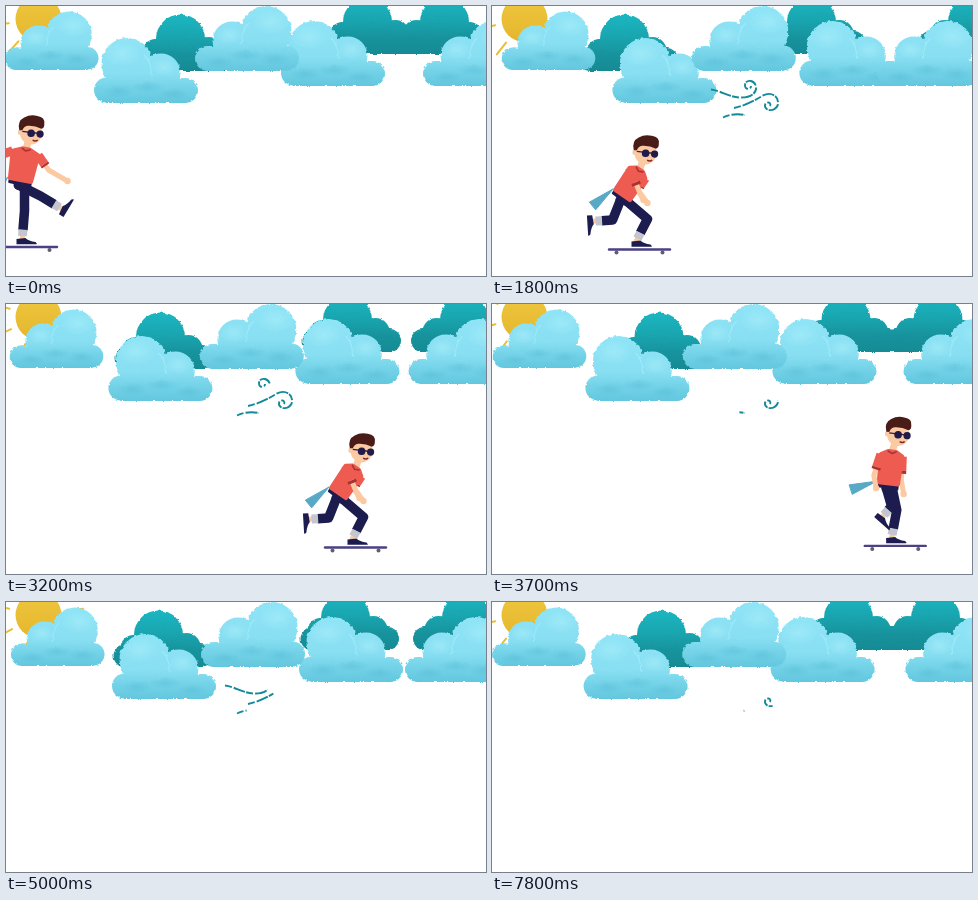
Recreate the animation shown at these times as an HTML page. Size 480 by 270 pixels, loop 8010 ms.

```html
<!DOCTYPE html>
<html lang="en">
<head>
<meta charset="utf-8">
<title>Skater under drifting clouds</title>
<style>
  html, body { margin: 0; width: 100%; height: 100%; overflow: hidden; background: #fff; }
  svg { display: block; width: 100%; height: 100%; }
</style>
</head>
<body>
<svg viewBox="0 0 480 270">
  <defs>
    <linearGradient id="pale" gradientUnits="userSpaceOnUse" x1="0" y1="0" x2="0" y2="65">
      <stop offset="0" stop-color="#8fe5f6"/>
      <stop offset=".55" stop-color="#89dff2"/>
      <stop offset=".76" stop-color="#75d3e8"/>
      <stop offset="1" stop-color="#63c7de"/>
    </linearGradient>
    <linearGradient id="deep" gradientUnits="userSpaceOnUse" x1="0" y1="9" x2="0" y2="65">
      <stop offset="0" stop-color="#1bb6c1"/>
      <stop offset=".4" stop-color="#19a5af"/>
      <stop offset=".7" stop-color="#17939d"/>
      <stop offset="1" stop-color="#158a94"/>
    </linearGradient>
    <linearGradient id="gold" x1="0" y1="0" x2="0" y2="1">
      <stop offset="0" stop-color="#efc740"/>
      <stop offset="1" stop-color="#e4b62c"/>
    </linearGradient>
    <radialGradient id="shade">
      <stop offset="0" stop-color="#4fb9d2" stop-opacity=".4"/>
      <stop offset="1" stop-color="#4fb9d2" stop-opacity="0"/>
    </radialGradient>
    <radialGradient id="glow">
      <stop offset="0" stop-color="#aef0fb" stop-opacity=".5"/>
      <stop offset="1" stop-color="#aef0fb" stop-opacity="0"/>
    </radialGradient>
    <filter id="rough" x="-5%" y="-5%" width="110%" height="110%" color-interpolation-filters="sRGB">
      <feTurbulence type="fractalNoise" baseFrequency=".25" numOctaves="2" seed="4"/>
      <feDisplacementMap in="SourceGraphic" scale="3" xChannelSelector="R" yChannelSelector="G"/>
    </filter>
    <g id="light" filter="url(#rough)">
      <g fill="url(#pale)">
        <circle cx="67" cy="35" r="19.5"/>
        <circle cx="33" cy="25.5" r="25.5"/>
        <circle cx="12.5" cy="52" r="12.5"/>
        <circle cx="91.5" cy="52.5" r="12.5"/>
        <rect x="12" y="40" width="80" height="25"/>
      </g>
      <path d="M50 17Q58 24 57 38" fill="none" stroke="#a9effb" stroke-opacity=".6" stroke-width="1.2"/>
      <ellipse cx="28" cy="16" rx="18" ry="12" fill="url(#glow)"/>
      <ellipse cx="70" cy="29" rx="13" ry="9" fill="url(#glow)"/>
      <ellipse cx="24" cy="53" rx="16" ry="7" fill="url(#shade)"/>
      <ellipse cx="53" cy="49" rx="17" ry="6" fill="url(#shade)"/>
      <ellipse cx="80" cy="56" rx="15" ry="6" fill="url(#shade)"/>
    </g>
    <g id="dark" filter="url(#rough)" fill="url(#deep)">
      <circle cx="28" cy="45" r="14"/>
      <circle cx="42" cy="53.5" r="11.5"/>
      <circle cx="-25" cy="46" r="13"/>
      <circle cx="-34" cy="54" r="11"/>
      <circle cx="0" cy="33" r="24.5"/>
      <rect x="-34" y="46" width="76" height="19"/>
    </g>
  </defs>
  <g id="rays" stroke="#e9be37" stroke-width="2" stroke-linecap="round"></g>
  <circle cx="32.5" cy="13" r="23" fill="url(#gold)"/>
  <g id="clouds"></g>
  <g id="wind" fill="none" stroke="#128a97" stroke-width="1.9"></g>
  <g id="skater"></g>
</svg>
<script>
const LOOP = 8010, FAST_END = 4600, STRIDE = 1400;
const $ = id => document.getElementById(id);
const SVG = 'http://www.w3.org/2000/svg';
const add = (parent, tag, attrs) => {
  const el = document.createElementNS(SVG, tag);
  for (const k in attrs) el.setAttribute(k, attrs[k]);
  return parent.appendChild(el);
};
const clamp = v => Math.min(1, Math.max(0, v));
const mix = (a, b, u) => a + (b - a) * u;
const mixPt = (p, q, u) => [mix(p[0], q[0], u), mix(p[1], q[1], u)];
const swing = t => 1 - Math.abs(1 - ((t + 4000) % 4000) / 2000);

// Sky
const clouds = [
  // shape, x, y, travel, x scale, y scale
  ['dark', 176, 0, -50, 1, 1],
  ['dark', 363, -17, -50, 1, 1],
  ['dark', 437, -17, 50, -1, 1],
  ['light', 92.5, 5.5, 12, -0.9, 0.9],
  ['light', 88, 32, 36, 1, 1],
  ['light', 275, 15, 36, 1, 1],
  ['light', 521, 15, -36, -1, 1],
  ['light', 293, 0, 12, -1, 1]
].map(([shape, x, y, travel, sx, sy]) => ({
  el: add($('clouds'), 'use', { href: '#' + shape }),
  lag: shape === 'dark' ? 60 : 0, x, y, travel, sx, sy
}));

for (let i = 0; i < 9; i++)
  add($('rays'), 'line', { x1: 30, x2: 45, transform: `rotate(${132 + i * 40})` });

function drawSky(t) {
  $('rays').setAttribute('transform', `translate(32.5 13) rotate(${t * 0.02})`);
  for (const c of clouds) {
    const x = c.x + c.travel * swing(t - c.lag);
    c.el.setAttribute('transform', `translate(${x} ${c.y}) scale(${c.sx} ${c.sy})`);
  }
}

// Wind: each stroke grows, rests, then is wiped from its start
const gusts = [
  ['M219 83.5C230 85 236 91 248 91.5C260 92 266 86 263.5 79C261 73 253 74 253 79C253 84 259 84 259 80', 350, 1500, 2600, 3500],
  ['M242 102C252 100 262 95 270 90C279 85 287 90 286 98C285 106 272 106 273 99C274 95 280 96 278 100', 650, 1700, 3200, 4000],
  ['M231 111.5C236 109 244 107 253 109', 680, 1400, 3250, 3850]
].map(([d, ...times]) => {
  const el = add($('wind'), 'path', { d });
  return { el, times, len: el.getTotalLength() };
});

function brokenDash(from, to) {
  const marks = [7, 2, 12, 1.2], out = [0];
  let end = 0;
  for (let s = 0, i = 0; s < to; s += marks[i] + marks[i + 1], i = (i + 2) % 4) {
    const a = Math.max(s, from), b = Math.min(s + marks[i], to);
    if (b > a) { out.push(a - end, b - a); end = b; }
  }
  return [...out, 999].join(' ');
}

function drawWind(t) {
  const w = t % 4000;
  for (const { el, times: [g0, g1, w0, w1], len } of gusts) {
    const from = len * clamp((w - w0) / (w1 - w0)), to = len * clamp((w - g0) / (g1 - g0));
    el.setAttribute('visibility', to > from ? 'visible' : 'hidden');
    el.setAttribute('stroke-dasharray', brokenDash(from, to));
  }
}

// Skater: joints relative to the middle of the board, y on the stage
const joints = ['head', 'chest', 'waist', 'elbowL', 'handL', 'elbowR', 'handR',
  'kneeS', 'ankleS', 'kneeK', 'ankleK', 'tail', 'size'];
// size holds half the shoulder width and the height of the board
const poses = [
  [0, 5,122, -1,147, -6,174, -32,151, -50,155, 22,164, 41,175, -2,205, -4,230, 14,190, 33,201.5, -34,190, 13,241],
  [.14, 6,132, -1,156, -10,181, -20,174, -20,189, 16,174, 24,187, 4,208, -3,231, -2,211, -8,232, -42,196, 11.5,242],
  [.286, 6.5,142, -2,167, -17,189, 0,186, 8,197, -2,184, 4,194, 8,213, -2,232.5, -27,214, -44,215, -47,200, 9.5,243.5],
  [.595, 3,126, -4,152, -7,180, -20,174, -15,188, 4,178, 4,192, 2,206, -3,231, -6,204, -17,212, -46,185, 10.5,242]
];
poses.push([1, ...poses[0].slice(1)]);

function poseAt(phase) {
  const i = Math.max(1, poses.findIndex(p => p[0] > phase));
  const a = poses[i - 1], b = poses[i], u = (phase - a[0]) / (b[0] - a[0]);
  const pose = {};
  joints.forEach((name, j) => {
    pose[name] = [1, 2].map(k => mix(a[2 * j + k], b[2 * j + k], u));
  });
  return pose;
}

// time, place, speed in px per second
const track = [[0, 20.5, 80], [833, 83.5, 70], [1800, 147.5, 90], [3200, 349.5, 130], [4200, 454.5, 120], [4600, 520, 170]];

function boardX(t) {
  const i = Math.max(1, track.findIndex(k => k[0] > t));
  const [t0, x0, v0] = track[i - 1], [t1, x1, v1] = track[i];
  const s = (t1 - t0) / 1000, u = (t - t0) / (t1 - t0), n = 1 - u;
  return x0 * (1 + 2 * u) * n * n + v0 * s * u * n * n + x1 * u * u * (3 - 2 * u) - v1 * s * u * u * n;
}

const SKIN = '#fbc9a2', RED = '#ee5b50', WINE = '#a83236', NAVY = '#1d1c4f', GREY = '#c3c5cf';
const line = (pts, w, color, cap = 'round') =>
  `<polyline points="${pts.join(' ')}" fill="none" stroke="${color}" stroke-width="${w}" stroke-linecap="${cap}" stroke-linejoin="round"/>`;
const area = (pts, color, w = 0) =>
  `<polygon points="${pts.join(' ')}" fill="${color}" stroke="${color}" stroke-width="${w}" stroke-linejoin="round"/>`;
const off = (p, d, k) => [p[0] + d[0] * k, p[1] + d[1] * k];
const dir = (p, q) => {
  const n = Math.hypot(q[0] - p[0], q[1] - p[1]) || 1;
  return [(q[0] - p[0]) / n, (q[1] - p[1]) / n];
};

function arm(shoulder, elbow, hand) {
  const hem = mixPt(shoulder, elbow, .6), edge = mixPt(shoulder, elbow, .72);
  return line([hem, elbow, hand], 5, SKIN) + line([hem, edge], 9, WINE, 'butt') +
    line([shoulder, hem], 9, RED, 'butt') + `<circle cx="${hand[0]}" cy="${hand[1]}" r="3.2" fill="${SKIN}"/>`;
}

function leg(hip, knee, ankle, flat) {
  const u = dir(knee, ankle);
  const turn = flat ? 0 : Math.atan2(u[1], u[0]) * 180 / Math.PI - 90;
  return line([off(ankle, u, -3), off(ankle, u, 3)], 5, SKIN) +
    line([hip, knee, off(ankle, u, -6)], 9.5, NAVY, 'butt') +
    `<circle cx="${hip[0]}" cy="${hip[1]}" r="5" fill="${NAVY}"/>` +
    line([off(ankle, u, -6.5), off(ankle, u, 0)], 9, GREY, 'butt') +
    `<path transform="translate(${ankle}) rotate(${turn})" fill="${NAVY}" d="M-6 3L3 2Q6 5 13 6Q15 8 14 8.3H-6Z"/>`;
}

const face = `
  <ellipse cx="0" cy="5" rx="11" ry="11.5" fill="${SKIN}"/>
  <circle cx="-10.5" cy="5" r="2.8" fill="${SKIN}"/>
  <path d="M-12 3Q-15 -6 -8 -10Q-2 -14 5 -12.5Q13 -12 12.5 -5Q13 -1 10 0Q3 -3 -4 -2Q-8 -1 -9 3Z" fill="#4a1c17"/>
  <path d="M-9 4L11 5" stroke="#2a2050" stroke-width="1.3"/>
  <circle cx="0" cy="5.3" r="3.8" fill="#211b4a"/>
  <circle cx="9" cy="5.5" r="3.6" fill="#211b4a"/>
  <path d="M2 12Q5 13.6 7 11.5" fill="none" stroke="#7a2a2a" stroke-width="1.4"/>`;

function drawSkater(t) {
  if (t >= FAST_END) { $('skater').innerHTML = ''; return; }
  const p = poseAt(t % STRIDE / STRIDE), [half, deck] = p.size;
  const up = dir(p.waist, p.chest), side = [-up[1], up[0]], low = 9 + (half - 9.5) * .5;
  const shL = off(p.chest, side, -half), shR = off(p.chest, side, half);
  const hemL = off(p.waist, side, -low), hemR = off(p.waist, side, low);
  const knot = [hemL[0] - 2, hemL[1] - 1];
  const flow = dir(knot, p.tail), across = [-flow[1], flow[0]];
  const collar = off(p.chest, up, 4);
  const wheel = x => `<circle cx="${x}" cy="${deck + 3}" r="2" fill="#655c70"/>`;

  $('skater').innerHTML =
    area([knot, off(p.tail, across, 5), off(p.tail, across, -5)], '#58a9c5', 1) +
    wheel(-23) + wheel(23) +
    line([[-30.5, deck], [30.5, deck]], 2.4, '#4a4284') +
    arm(shR, p.elbowR, p.handR) +
    leg([p.waist[0] + 4, p.waist[1] + 6], p.kneeS, p.ankleS, true) +
    leg([p.waist[0] - 2, p.waist[1] + 5], p.kneeK, p.ankleK, false) +
    area([hemL, hemR, off(hemR, up, -5), off(hemL, up, -4)], NAVY, 2) +
    line([[p.head[0] - 3, p.head[1] + 12], collar], 7, SKIN) +
    area([shL, off(collar, side, -4), off(collar, side, 4), shR, hemR, hemL], RED, 4) +
    line([off(collar, side, -4), off(p.chest, up, 2), off(collar, side, 4)], 1.6, WINE) +
    `<g transform="translate(${p.head}) rotate(4)">${face}</g>` +
    arm(shL, p.elbowL, p.handL);
  $('skater').setAttribute('transform', `translate(${boardX(t)} 0)`);
}

// Thirty steps a second while the skater is out, then five
function stepTime(t) {
  if (t >= FAST_END) return Math.min(7800, Math.floor(t / 200) * 200);
  const start = k => Math.round(k * 10 / 3) * 10;
  let k = Math.floor(t * .03) + 1;
  while (start(k) > t) k--;
  return k * 100 / 3;
}

let shown = -1;
function render(now) {
  const t = stepTime(now % LOOP);
  if (t !== shown) {
    shown = t;
    drawSky(t);
    drawWind(t);
    drawSkater(t);
  }
}

const begin = performance.now();
function tick() {
  render(performance.now() - begin);
  requestAnimationFrame(tick);
}
tick();
</script>
</body>
</html>
```
